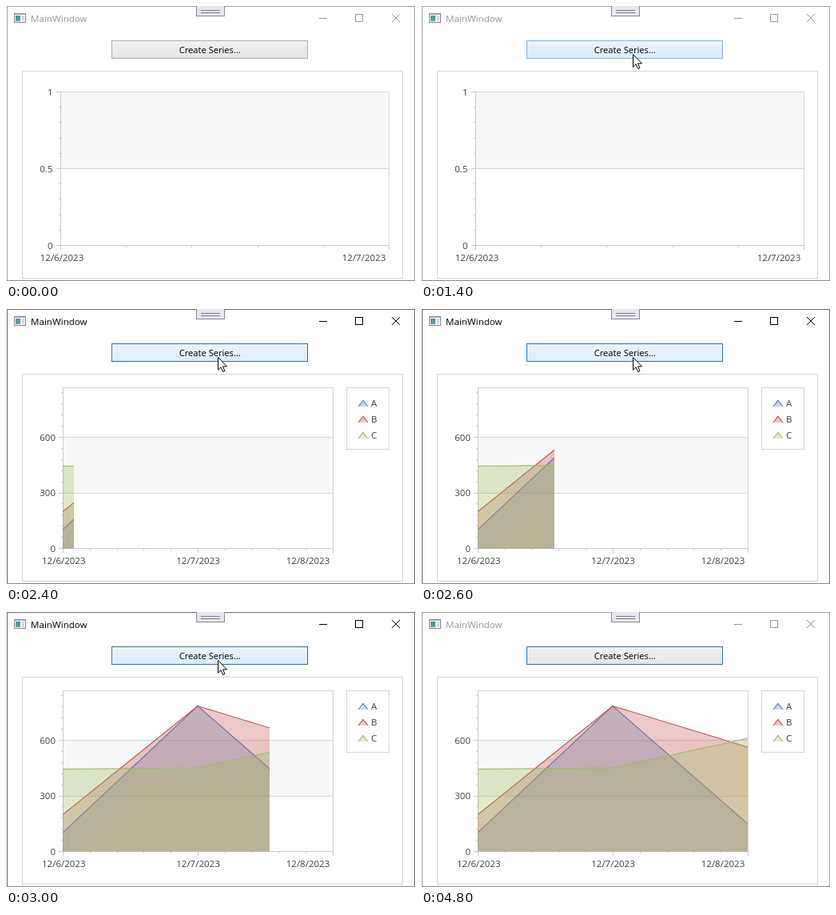
Recreate the animation shown at these times as an HTML page. Size 512 px wide and 344 px high, loop 4900 ms.

```html
<!DOCTYPE html>
<html lang="en">
<head>
<meta charset="utf-8">
<title>MainWindow</title>
<style>
html, body { margin: 0; width: 100%; height: 100%; overflow: hidden; background: #fefefe; }
svg { position: absolute; left: 0; top: 0; display: block; }
text { font: 11.5px "Open Sans", "Noto Sans", sans-serif; fill: #404040; }
.end { text-anchor: end; }
.mid { text-anchor: middle; }
.crisp { shape-rendering: crispEdges; }
.line { fill: none; stroke: #d6d6d6; }
.axis { fill: none; stroke: #cacaca; }
.band { fill: #f7f7f8; }

.a { --c: #4f81bd; }
.b { --c: #c0504d; }
.c { --c: #9bbb59; }
.fill { fill: var(--c); fill-opacity: .31; }
.edge { fill: none; stroke: var(--c); stroke-width: 1.1; }

.win { animation: active 4.9s step-end infinite, button 4.9s step-end infinite; }
.early { animation: early 4.9s step-end infinite; }
.late { animation: late 4.9s step-end infinite; }
.pointer { animation: point 4.9s step-end infinite; }
.areas { left: 71px; top: 98px; animation: late 4.9s step-end infinite, reveal 4.9s infinite; }

.frame { fill: none; stroke: var(--frame); }
.title { font-size: 11.6px; fill: var(--ink); }
.caption { fill: none; stroke: var(--ink); }
.label { font-size: 11.15px; fill: #000; text-anchor: middle; }

@keyframes active {
  0%, 97.95% { --ink: #999; --frame: #a2a2a2; }
  36.73% { --ink: #000; --frame: #6c6c6c; }
}
@keyframes button {
  0% { --top: #f0f0f0; --low: #e5e5e5; --rim: #acacac; --side: #acacac; }
  26.52% { --top: #eef2f6; --low: #e1e8f0; --rim: #7eb4ea; --side: #7eb4ea; }
  28.57% { --top: #ecf4fc; --low: #dcecfc; --rim: #7eb4ea; --side: #7eb4ea; }
  36.73% { --top: #daecfc; --low: #c4e0fc; --rim: #35709a; --side: #1a7bc4; }
  48.97% { --top: #ecf4fc; --low: #dcecfc; --rim: #35709a; --side: #1a7bc4; }
  69.38% { --top: #eef2f6; --low: #e1e8f0; --rim: #35709a; --side: #1a7bc4; }
  71.42%, 100% { --top: #f0f0f0; --low: #e5e5e5; --rim: #35709a; --side: #1a7bc4; }
}
@keyframes early { 0% { visibility: visible; } 48.97%, 100% { visibility: hidden; } }
@keyframes late { 0% { visibility: hidden; } 48.97%, 100% { visibility: visible; } }
@keyframes reveal {
  0% { clip-path: inset(0 324px 0 0); animation-timing-function: step-end; }
  48.97% { clip-path: inset(0 324px 0 0); animation-timing-function: steps(8, end); }
  65.3%, 100% { clip-path: inset(0 -2px 0 0); }
}
@keyframes point {
  0% { visibility: hidden; transform: translate(186px, 285px); }
  14.28% { visibility: visible; transform: translate(186px, 285px); }
  16.32% { visibility: visible; transform: translate(210px, 222px); }
  18.36% { visibility: visible; transform: translate(229px, 167px); }
  20.4% { visibility: visible; transform: translate(244px, 121px); }
  22.44% { visibility: visible; transform: translate(254px, 93px); }
  24.48% { visibility: visible; transform: translate(261px, 72px); }
  26.52% { visibility: visible; transform: translate(265px, 60px); }
  69.38% { visibility: visible; transform: translate(268px, 86px); }
  71.42%, 100% { visibility: hidden; transform: translate(268px, 86px); }
}
</style>
</head>
<body>
<svg class="win" width="512" height="344" viewBox="0 0 512 344">
  <defs>
    <linearGradient id="face" x2="0" y2="1">
      <stop style="stop-color: var(--top)"/>
      <stop offset="1" style="stop-color: var(--low)"/>
    </linearGradient>
    <linearGradient id="pane" x2="0" y2="1">
      <stop stop-color="#4f86b8"/>
      <stop offset="1" stop-color="#5fae86"/>
    </linearGradient>
  </defs>
  <rect width="512" height="344" fill="#fefefe"/>

  <!-- Window frame and title bar -->
  <path class="frame crisp" d="M1.5 343V.5H511.5V343"/>
  <path class="crisp" stroke="#8c8c8c" d="M1 343.5H512"/>
  <g class="crisp">
    <rect x="10.5" y="9.5" width="14" height="11" fill="#f4f6f8" stroke="#848b92"/>
    <path d="M11 10.5H24" stroke="#b4bac0"/>
    <rect x="12" y="12" width="6" height="7" fill="url(#pane)"/>
    <path d="M20 13.5H23M20 15.5H23M20 17.5H23" stroke="#b4bac0"/>
  </g>
  <text class="title" x="31" y="20">MainWindow</text>
  <path class="caption crisp" d="M392 15.5H402M437.5 10.5H446.5V19.5H437.5Z"/>
  <path class="caption" d="M483 10L493 20M493 10L483 20"/>
  <rect class="crisp" x="238.5" y="-.5" width="35" height="13" fill="#e7e8ee" stroke="#858a9e"/>
  <path class="crisp" d="M244 5.5H268M244 8.5H268" stroke="#747a90"/>

  <!-- Button -->
  <rect class="crisp" x="132.5" y="43.5" width="245" height="22" fill="url(#face)" style="stroke: var(--rim)"/>
  <path class="crisp" d="M132.5 43V66" style="stroke: var(--side)"/>
  <text class="label" x="255.3" y="59">Create Series...</text>

  <rect class="line crisp" x="20.5" y="81.5" width="476" height="259"/>

  <!-- Empty chart -->
  <g class="early">
    <g class="crisp">
      <rect class="band" x="68" y="107" width="411" height="96"/>
      <path class="line" d="M68 107.5H479.5V299M68 203.5H479"/>
      <path class="axis" d="M68.5 107V299.5H480"/>
      <path class="axis" stroke-width="2" stroke-dasharray="1 18.2" d="M67 107V300"/>
      <path class="axis" stroke-width="5" stroke-dasharray="1 95" d="M65.5 107V300"/>
      <path class="axis" stroke-width="2" stroke-dasharray="1 81.2" d="M68 301H480"/>
      <path class="axis" stroke-width="5" stroke-dasharray="1 410" d="M68 302.5H480"/>
    </g>
    <text class="end" x="58.5" y="112">1</text>
    <text class="end" x="58.5" y="208">0.5</text>
    <text class="end" x="58.5" y="304">0</text>
    <text class="mid" x="70" y="319">12/6/2023</text>
    <text class="mid" x="448" y="319">12/7/2023</text>
  </g>

  <!-- Filled chart -->
  <g class="late">
    <g class="crisp">
      <rect class="band" x="71" y="160" width="338" height="70"/>
      <path class="line" d="M71 98.5H409.5V299M71 160.5H409M71 230.5H409"/>
      <path class="axis" d="M71.5 98V299.5H410"/>
      <path class="axis" stroke-width="2" stroke-dasharray="1 12.9" d="M70 300V98"/>
      <path class="axis" stroke-width="5" stroke-dasharray="1 68.5" d="M68.5 300V98"/>
      <path class="axis" stroke-width="2" stroke-dasharray="1 32.8" d="M71 301H410"/>
      <path class="axis" stroke-width="5" stroke-dasharray="1 168" d="M71 302.5H410"/>
      <rect class="line" x="426.5" y="98.5" width="53" height="77"/>
    </g>
    <text class="end" x="62" y="165">600</text>
    <text class="end" x="62" y="234">300</text>
    <text class="end" x="62" y="304">0</text>
    <text class="mid" x="72.3" y="319">12/6/2023</text>
    <text class="mid" x="240.5" y="319">12/7/2023</text>
    <text class="mid" x="378" y="319">12/8/2023</text>
    <g class="a">
      <path class="fill" d="M441 122L447 114.5L453 122Z"/>
      <path class="edge" d="M441 122L447 114.5L453 122"/>
      <text x="457" y="122">A</text>
    </g>
    <g class="b" transform="translate(0 20)">
      <path class="fill" d="M441 122L447 114.5L453 122Z"/>
      <path class="edge" d="M441 122L447 114.5L453 122"/>
      <text x="457" y="122">B</text>
    </g>
    <g class="c" transform="translate(0 40)">
      <path class="fill" d="M441 122L447 114.5L453 122Z"/>
      <path class="edge" d="M441 122L447 114.5L453 122"/>
      <text x="457" y="122">C</text>
    </g>
  </g>

  <path class="pointer" d="M.5 .5V16.3L4.1 12.8L6.6 18.5L8.9 17.5L6.5 11.9H11.5Z" fill="#fff" stroke="#000"/>
</svg>

<svg class="areas" width="338" height="202" viewBox="71 98 338 202">
  <g class="a">
    <path class="fill" d="M71 299.5V276L240 117.5L409 265V299.5Z"/>
    <path class="edge" d="M71 276L240 117.5L409 265"/>
  </g>
  <g class="b">
    <path class="fill" d="M71 299.5V253.5L240 117.5L409 169V299.5Z"/>
    <path class="edge" d="M71 253.5L240 117.5L409 169"/>
  </g>
  <g class="c">
    <path class="fill" d="M71 299.5V196.5L240 195L409 158V299.5Z"/>
    <path class="edge" d="M71 196.5L240 195L409 158"/>
  </g>
</svg>
</body>
</html>
```
